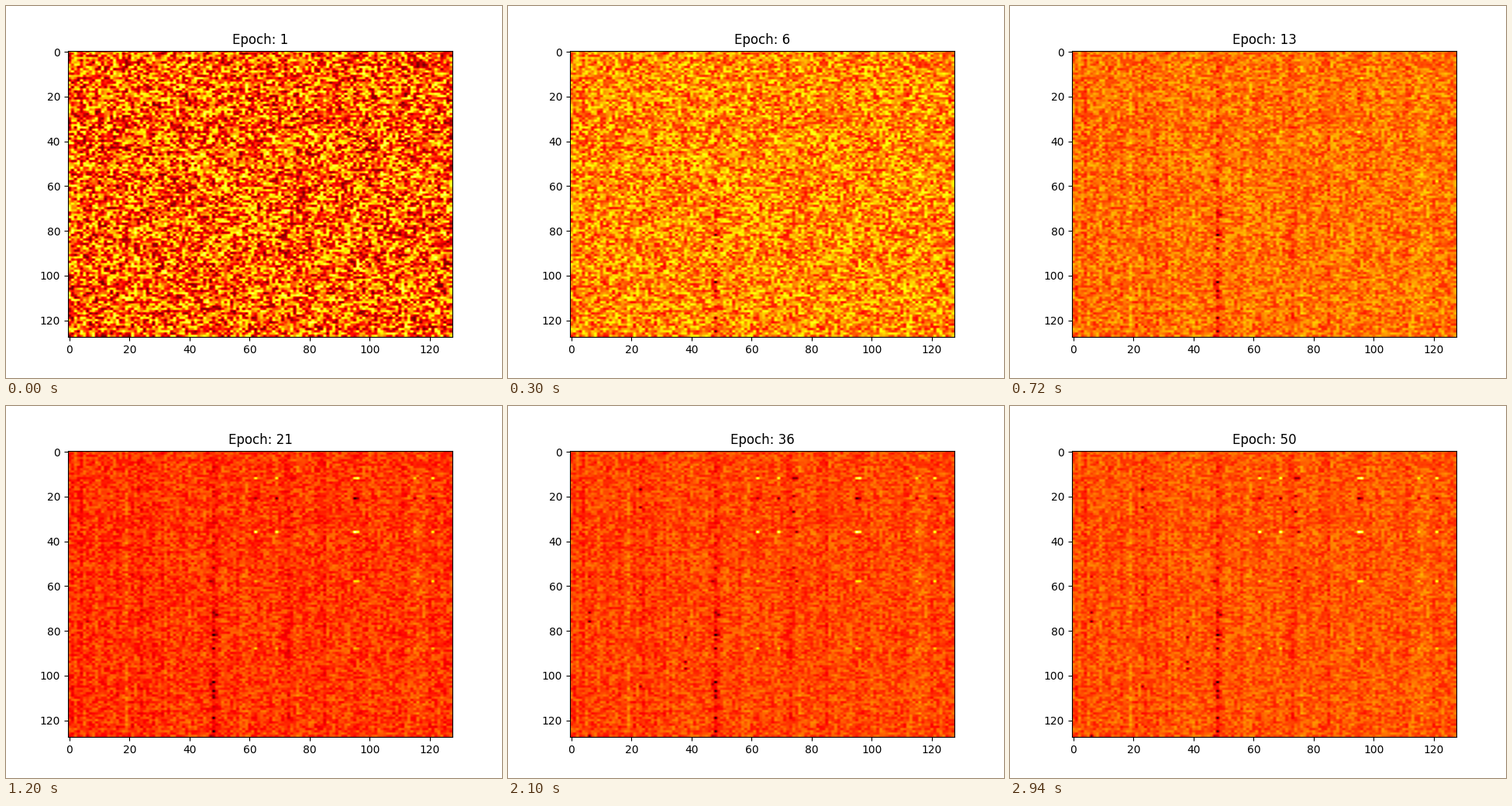
Write a matplotlib script that moves like this. It is 640 px wide and 480 px high and loops after 3000 ms.

```python
import numpy as np
import matplotlib.pyplot as plt
from matplotlib.animation import FuncAnimation

SIZE = 128
EPOCHS = 50
rng = np.random.default_rng(7)


def ramp(x, start, end):
    return np.clip((x - start) / (end - start), 0, 1)


def sparse(weights):
    v = np.zeros(SIZE)
    for i, w in weights.items():
        v[i] = w
    return v


noise = rng.uniform(-1, 1, (SIZE, SIZE))

# Vertical stripes: random columns with a few clearly darker bands.
x = np.arange(SIZE)
bands = sum(np.exp(-((x - c) / 1.5) ** 2) for c in (4, 24, 48, 73, 84, 109, 121))
stripes = (rng.normal(.2, .7, SIZE) - 1.2 * bands) * rng.uniform(.5, 1.3, (SIZE, 1))

# Bright cells where strong inputs meet strong units; one row is inverted.
units = sparse({12: .85, 21: -.6, 36: 1, 58: .5, 88: .4})
inputs = sparse({62: 1, 69: .9, 95: 1.1, 96: 1, 115: .5, 121: .9})
spots = np.outer(units, inputs)

# Dark cells gather around one input column.
dark = np.zeros((SIZE, SIZE))
rows = np.clip(rng.normal(88, 25, 22), 0, SIZE - 1).astype(int)
dark[rows, rng.choice([47, 48, 48, 49], rows.size)] = -rng.uniform(.4, 1, rows.size)
dark[[82, 103], 48] = -1.7

# More dark cells appear later in a few columns.
late = np.zeros((SIZE, SIZE))
for col in (6, 23, 38, 74):
    late[rng.integers(0, SIZE, 4), col] = -1
late[[12, 36, 58], 75] = -1


def weights(epoch):
    mean = np.interp(epoch, [1, 10, 13, 21, 50], [.5, .625, .535, .445, .49])
    spread = .09 + .27 * np.exp(-(epoch - 1) / 6)
    w = (mean + spread * noise
         + .027 * ramp(epoch, 2, 10) * stripes
         + .32 * ramp(epoch, 1, 4) * dark
         + .5 * ramp(epoch, 8, 19) * spots
         + .27 * ramp(epoch, 13, 36) * late)
    return np.clip(w, 0, 1)


fig, ax = plt.subplots(figsize=(6.4, 4.8), dpi=100)
image = ax.imshow(weights(1), cmap="hot", vmin=0, vmax=1, aspect="auto")
title = ax.set_title("Epoch: 1")


def update(i):
    image.set_data(weights(i + 1))
    title.set_text(f"Epoch: {i + 1}")
    return image, title


anim = FuncAnimation(fig, update, frames=EPOCHS, interval=60, repeat=True,
                     repeat_delay=0, blit=False)
plt.show()
```
